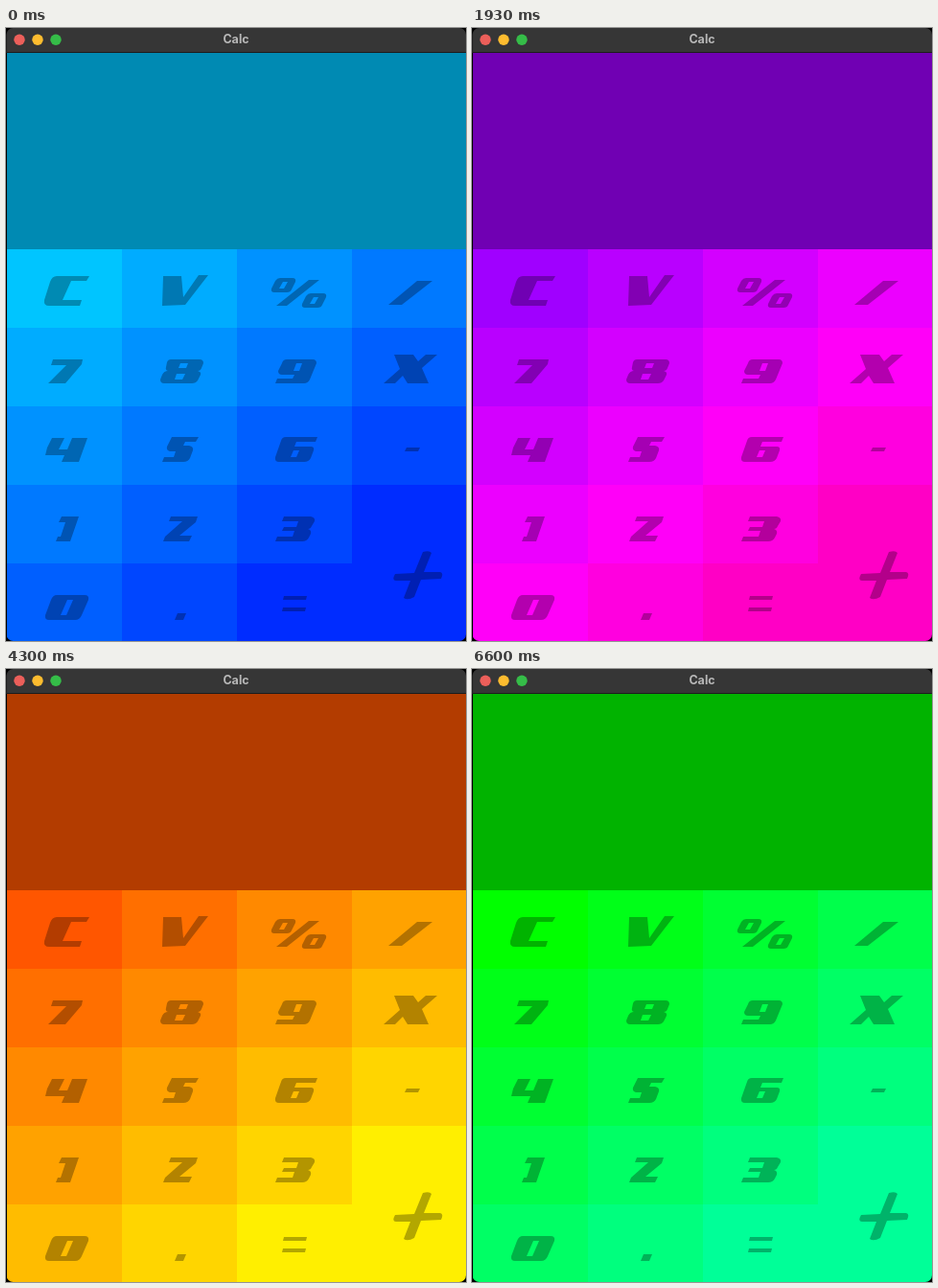
These frames come from a looping animation (480x640 px, 6650 ms). An HTML page with a canvas:

```html
<!DOCTYPE html>
<html lang="en">
<head>
<meta charset="utf-8">
<title>Calc</title>
<style>
html, body { margin: 0; width: 100%; height: 100%; overflow: hidden; background: #000; }
canvas { display: block; width: 480px; height: 640px; }
</style>
</head>
<body>
<canvas id="stage" width="480" height="640"></canvas>
<script>
const ctx = document.getElementById('stage').getContext('2d');
const LOOP = 6650, STEP = 71.7, LEAD = 6;
const START_HUE = 193.6, HUE_STEP = 3.11, KEY_HUE = 6;
const LEFT = 1, TOP = 231, COL = 120, ROW = 82;

// One key per entry: column, row, rows spanned, glyph outline
const keys = [
  [0, 0, 1, 'M53 259H87L84 264H68L59 284H79L77 290H45Q39 290 40 284L46 265Q48 259 53 259Z'],
  [1, 0, 1, 'M164 259H183L185 281L201 258H211L187 289L163 290Z'],
  [2, 0, 1, 'M286 261H299Q303 261 302 265L298 273Q297 276 293 276H280Q276 276 277 272L281 264Q283 261 286 261Z' +
            'M289 265L285 272H290L294 265Z' +
            'M316 263H327L293 290H282Z' +
            'M318 277H331Q335 277 334 281L330 289Q329 292 325 292H312Q308 292 309 288L313 280Q315 277 318 277Z' +
            'M321 281L317 288H322L326 281Z'],
  [3, 0, 1, 'M429 264H445L413 289H399Z'],
  [0, 1, 1, 'M49 346H80L79 351L62 371H44L63 352H47Z'],
  [1, 1, 1, 'M172 346H202Q206 346 206 350L204 355Q203 358 200 358Q204 359 203 362L200 368Q198 371 194 371H165Q161 371 161 367L163 362Q165 358 169 358Q166 357 167 354L168 349Q169 346 172 346Z' +
            'M182 350L180 355H188L190 350ZM178 361L176 367H184L187 361Z'],
  [2, 1, 1, 'M293 346H320Q324 346 324 350L317 367Q315 371 311 371H281L283 366H299L301 362H288Q284 362 284 358L288 350Q289 346 293 346Z' +
            'M303 350L300 358H306L309 350Z'],
  [3, 1, 1, 'M405 341H425L430 348L438 341H450L434 355L441 371H419L414 363L406 371H394L411 356Z'],
  [0, 2, 1, 'M48 428H61L55 440H64L69 428H85L76 453H58L61 446H41L43 438Z'],
  [1, 2, 1, 'M173 427H201L198 432H187L185 436H191Q196 437 195 441L192 449Q190 453 185 453H163L165 448H175L177 442H171Q167 441 168 437Z'],
  [2, 2, 1, 'M292 427H325L323 432H303L301 437H318Q322 437 321 441L318 449Q316 453 311 453H285Q280 453 281 448L287 431Q288 427 292 427Z' +
            'M300 441L297 448H303L306 441Z'],
  [3, 2, 1, 'M418 438H432L430 442H416Z'],
  [0, 3, 1, 'M58 510H76L67 536H52L54 531H57L62 516H55Z'],
  [1, 3, 1, 'M172 510H200L198 516L181 530H194L191 536H164L166 531L184 515H170Z'],
  [2, 3, 1, 'M290 510H318Q323 511 322 515L319 520Q318 523 315 523Q319 524 318 528L316 532Q314 536 309 536H281L283 531H299L301 525H288L290 521H303L305 515H288Z'],
  [3, 3, 2, 'M435 547Q442 545 444 548L436 568H453Q457 569 454 575L433 576L426 594Q419 598 415 595L422 577H407Q402 577 406 570L426 569Z'],
  [0, 4, 1, 'M53 592H82Q87 592 86 597L79 613Q77 618 72 618H45Q40 618 41 613L47 597Q49 592 53 592Z' +
            'M64 597L57 613H63L70 597Z'],
  [1, 4, 1, 'M179 611H188L185 618H176Z'],
  [2, 4, 1, 'M290 593H314L313 597H289ZM289 605H313L312 609H288Z']
].map(([col, row, span, d]) => ({ col, row, span, glyph: new Path2D(d) }));

const bright = hue => `hsl(${hue % 360} 100% 50%)`;
const dim = hue => `hsl(${hue % 360} 100% 35%)`;

function rect(x, y, w, h, fill) {
  ctx.fillStyle = fill;
  ctx.fillRect(x, y, w, h);
}

function drawTitleBar() {
  rect(0, 0, 480, 26, '#363636');
  rect(0, 25, 480, 1, '#1c1c1c');
  ['#ec5f5a', '#fdbc2f', '#35bd48'].forEach((fill, i) => {
    ctx.fillStyle = fill;
    ctx.beginPath();
    ctx.arc(14 + 19 * i, 12.3, 5.7, 0, Math.PI * 2);
    ctx.fill();
  });
  ctx.fillStyle = '#b8b8b8';
  ctx.font = 'bold 12.5px Inter, Arial, sans-serif';
  ctx.textAlign = 'center';
  ctx.fillText('Calc', 240, 16.3);
}

function drawKey({ col, row, span, glyph }, base) {
  const hue = base + KEY_HUE * (col + row);
  rect(LEFT + col * COL, TOP + row * ROW, COL, span * ROW, bright(hue));
  ctx.fillStyle = dim(hue);
  ctx.fill(glyph, 'evenodd');
}

function draw(ms) {
  const hue = START_HUE + HUE_STEP * Math.floor((ms % LOOP + LEAD) / STEP);
  rect(0, 0, 480, 640, '#000');
  ctx.save();
  ctx.beginPath();
  ctx.roundRect(0.5, 0, 479.5, 640, 7);
  ctx.clip();
  drawTitleBar();
  rect(LEFT, 26, 479, TOP - 26, dim(hue));
  keys.forEach(key => drawKey(key, hue));
  ctx.restore();
}

const start = performance.now();
function tick() {
  draw(performance.now() - start);
  requestAnimationFrame(tick);
}
tick();
</script>
</body>
</html>
```
